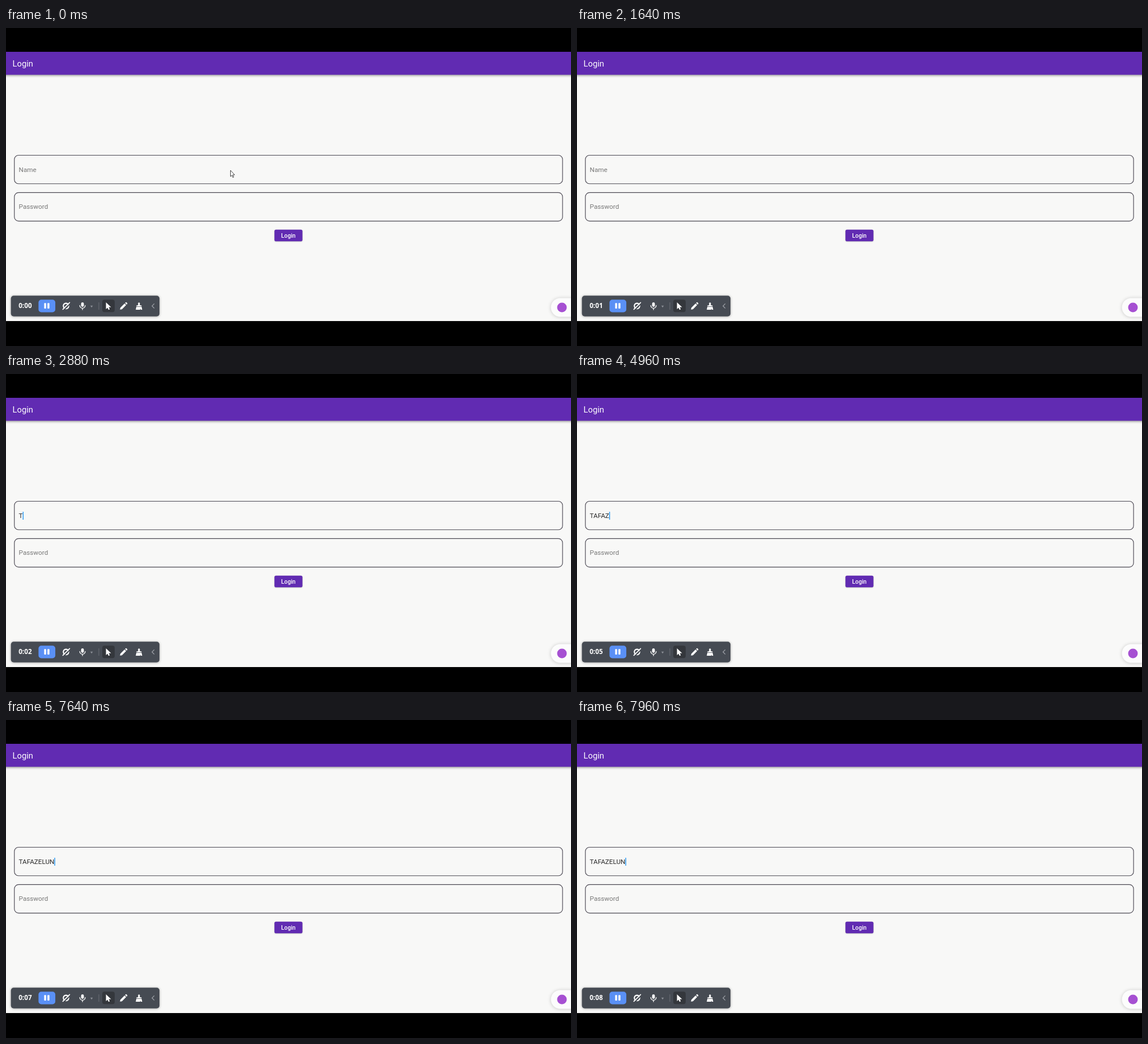
An HTML page with a canvas for the animation above (8 s loop, 998x561 px).

```html
<!DOCTYPE html>
<html lang="en">
<head>
<meta charset="utf-8">
<title>Login form</title>
<style>
html, body { margin: 0; width: 100%; height: 100%; overflow: hidden; background: #000; }
canvas { display: block; width: 998px; height: 561px; }
</style>
</head>
<body>
<canvas id="stage" width="998" height="561"></canvas>
<script>
const ctx = document.getElementById('stage').getContext('2d');
const LOOP = 8000;
const UI = 'Roboto, sans-serif';
const PURPLE = '#612bb2';
const PANEL = '#464b53';
const NAME = 'TAFAZELUN';
const KEY_TIMES = [2700, 3480, 4360, 4680, 4880, 5240, 5560, 6000, 6560];
const BLINK = 500;
const MOUSE_HIDE = 40;
const FIRST_TICK = 920;

function box(x, y, w, h, r, fill) {
  ctx.beginPath();
  ctx.roundRect(x, y, w, h, r);
  ctx.fillStyle = fill;
  ctx.fill();
}

function shadowed(color, blur, dy, draw) {
  ctx.save();
  ctx.shadowColor = color;
  ctx.shadowBlur = blur;
  ctx.shadowOffsetY = dy;
  draw();
  ctx.restore();
}

function label(text, x, y, font, color) {
  ctx.font = font;
  ctx.fillStyle = color;
  ctx.fillText(text, x, y);
  return ctx.measureText(text).width;
}

function shape(d, fill, stroke, width = 1) {
  const path = new Path2D(d);
  if (fill) {
    ctx.fillStyle = fill;
    ctx.fill(path);
  }
  if (stroke) {
    ctx.strokeStyle = stroke;
    ctx.lineWidth = width;
    ctx.stroke(path);
  }
}

function field(y) {
  ctx.beginPath();
  ctx.roundRect(14.8, y, 968.3, 50.2, 7.3);
  ctx.strokeStyle = '#4a4752';
  ctx.lineWidth = 1.15;
  ctx.stroke();
}

function page() {
  ctx.fillStyle = '#f8f8f7';
  ctx.fillRect(0, 42, 998, 475);
  shadowed('rgba(0,0,0,.4)', 4, 1, () => box(-10, 42, 1018, 40.6, 0, PURPLE));
  label('Login', 11.6, 68.4, '14.7px ' + UI, '#fff');
  field(224.5);
  field(290.4);
  label('Password', 22.6, 319.4, '11.7px ' + UI, '#777');
  shadowed('rgba(0,0,0,.3)', 2, 0.6, () => box(474.2, 355.8, 49.4, 20.4, 2.8, PURPLE));
  label('Login', 486.1, 369.9, '500 10.2px ' + UI, '#fff');
}

function nameField(t) {
  const count = KEY_TIMES.filter(k => k <= t).length;
  if (!count) {
    label('Name', 22.6, 253.9, '11.7px ' + UI, '#777');
    return;
  }
  const width = label(NAME.slice(0, count), 22.6, 253.9, '11.7px ' + UI, '#262626');
  // The caret's blink restarts with every key.
  const idle = t - KEY_TIMES[count - 1];
  if (Math.floor(idle / BLINK) % 2 === 0) {
    ctx.fillStyle = '#2196f3';
    ctx.fillRect(22.6 + width, 243, 1.4, 14);
  }
}

function recorder(t) {
  shadowed('rgba(0,0,0,.35)', 4, 0.5, () => box(8.7, 472.2, 262.4, 36.5, 5, PANEL));
  const seconds = Math.max(0, Math.floor((t - FIRST_TICK) / 1000) + 1);
  label('0:0' + seconds, 22.2, 494, '700 11.7px "Open Sans", sans-serif', '#fff');

  box(57.4, 479.2, 29.7, 22.2, 5, '#5a90f5');
  box(67.4, 485.3, 3.5, 9.8, 1, '#fff');
  box(73.2, 485.3, 3.5, 9.8, 1, '#fff');

  ctx.lineCap = 'round';
  // camera off
  shape('M106 485.6a4.8 4.8 0 1 0 .01 0z', null, '#fff', 2.2);
  shape('M101.6 498L113.6 486', null, PANEL, 1.8);
  shape('M100.4 496.4L112.4 484.4', null, '#fff', 1.7);
  // microphone
  box(132.7, 484, 4.8, 8, 2.4, '#fff');
  shape('M130.3 489.5a4.8 4.8 0 0 0 9.6 0M135.1 494.5V497', null, '#fff', 1.3);
  shape('M149 489.8h4.4l-2.2 3.4z', '#8b8e95');
  ctx.fillStyle = '#6b6e76';
  ctx.fillRect(163.5, 484, 1, 13);
  // pointer
  box(170, 479.2, 22, 22, 4, '#34373c');
  shape('M176.6 484V496L179.4 493.5L181.2 497.2L183.3 496.2L181.6 492.6H185.6Z', '#fff');
  // pencil
  shape('M201.3 496.8L202 493.4L209.4 486L212.2 488.8L204.8 496.2Z' +
        'M210.3 485.1L211.5 484Q212.2 483.5 212.9 484.1L214.2 485.4Q214.7 486.1 214.1 486.8L213 487.9Z', '#fff');
  // brush
  shape('M233.4 485Q234.9 483.6 236.4 485V489.2H238.6Q239.4 489.2 239.4 490V491.2H230.4V490Q230.4 489.2 231.2 489.2H233.4Z' +
        'M230.2 492H239.6L240.6 496.9H237.8V494.6L236.8 496.9H229.2Z', '#fff');
  shape('M261.6 486.6L257.9 490.4L261.6 494.2', null, '#a3a6ac', 1.2);
}

function sideTab() {
  shadowed('rgba(0,0,0,.2)', 6, 0.5, () => box(962.5, 476.5, 50, 33, 16.5, '#fcfcfc'));
  ctx.beginPath();
  ctx.arc(982, 493, 8.5, 0, Math.PI * 2);
  ctx.fillStyle = '#a650d2';
  ctx.fill();
}

function mouse() {
  shape('M396.5 251.4V262L398.9 259.8L400.7 263.7L402.3 263L400.5 259.1H403.5Z', '#fff', '#333', 0.9);
}

function draw(t) {
  ctx.fillStyle = '#000';
  ctx.fillRect(0, 0, 998, 561);
  ctx.save();
  ctx.beginPath();
  ctx.rect(0, 42, 998, 475);
  ctx.clip();
  page();
  nameField(t);
  recorder(t);
  sideTab();
  if (t < MOUSE_HIDE) mouse();
  ctx.restore();
}

const start = performance.now();
function frame() {
  draw((performance.now() - start) % LOOP);
  requestAnimationFrame(frame);
}
frame();
</script>
</body>
</html>
```
